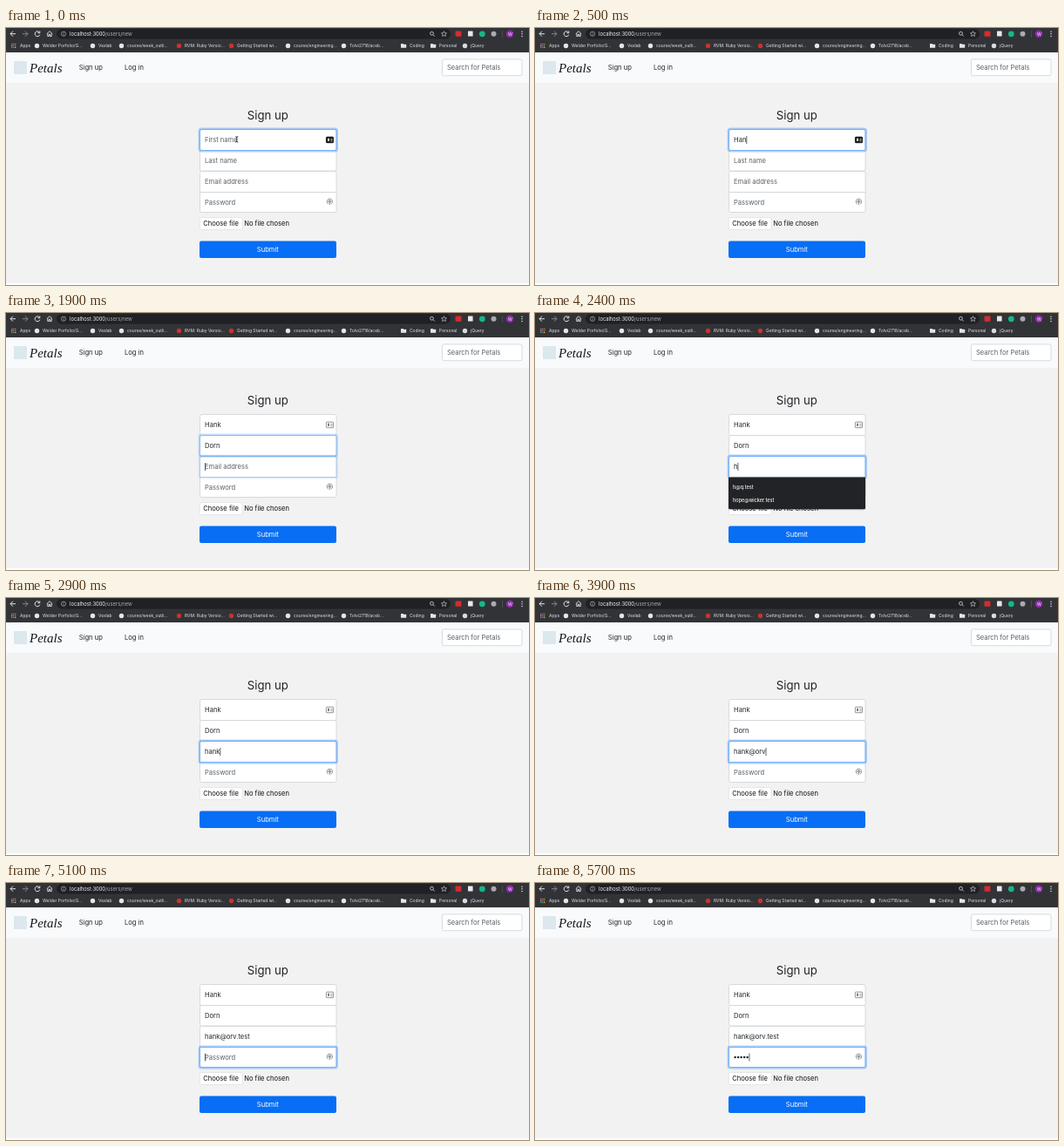
Write an HTML page with a canvas that moves like this. It is 600x295 px and loops after 5.8 s.

```html
<!DOCTYPE html>
<html lang="en">
<head>
<meta charset="utf-8">
<title>Sign up</title>
<style>
html, body { margin: 0; width: 100%; height: 100%; overflow: hidden; background: #f2f2f2; }
canvas { display: block; width: 600px; height: 295px; }
</style>
</head>
<body>
<canvas id="stage"></canvas>
<script>
const LOOP = 5800, STEP = 100;
const canvas = document.getElementById('stage');
const ctx = canvas.getContext('2d');
const ratio = window.devicePixelRatio || 1;
canvas.width = 600 * ratio;
canvas.height = 295 * ratio;

const INK = '#24282c', MUTED = '#5c6268', BORDER = '#ced3d8', LIGHT = '#e4e5e7';
const LEFT = 222.5, WIDTH = 156.5;

// keys: [time, number of characters typed so far]
const fields = [
  { y: 116.5, h: 24, hint: 'First name', value: 'Hank', focusAt: -1000, caretAt: 300,
    radii: 2, keys: [[300, 1], [500, 3], [600, 4]] },
  { y: 140.5, h: 23.5, hint: 'Last name', value: 'Dorn', focusAt: 760, caretAt: 800,
    radii: 2, keys: [[1200, 1], [1400, 2], [1500, 3], [1600, 4]] },
  { y: 164.5, h: 24, hint: 'Email address', value: 'hank@orv.test', focusAt: 1860, caretAt: 1900,
    radii: [2, 2, 0, 0], keys: [[2300, 1], [2500, 2], [2600, 3], [2700, 4], [3400, 5], [3700, 7],
      [3900, 8], [4000, 9], [4300, 10], [4500, 11], [4700, 13]] },
  { y: 188.5, h: 23, hint: 'Password', value: '*****', secret: true, focusAt: 4860, caretAt: 4900,
    radii: [0, 0, 2, 2], keys: [[5300, 1], [5400, 2], [5500, 3], [5600, 4], [5700, 5]] }
];
const menus = [
  { from: 300, to: 500, y: 141, items: ['H', 'Hope'] },
  { from: 2300, to: 2500, y: 188.7, items: ['h@q.test', 'hope@wicker.test'] }
];
const bookmarks = [
  [16, 'Apps'], [42, 'Welder Porfolio/G...', LIGHT], [106, 'Vexlab', LIGHT],
  [139, 'course/week_outli...', LIGHT], [205, 'RVM: Ruby Versio...', '#c8322f'],
  [265, 'Getting Started wi...', '#c8322f'], [330, 'course/engineering...', LIGHT],
  [394, 'Tolvi2718/aceb...', LIGHT], [463, 'Coding', 'folder'], [497, 'Personal', 'folder'],
  [533, 'jQuery', '#d5dbe2']
];

function text(str, x, y, size, color = INK, font = 'Inter, sans-serif', style = '') {
  ctx.font = `${style} ${size}px ${font}`;
  ctx.fillStyle = color;
  ctx.fillText(str, x, y);
  return x + ctx.measureText(str).width;
}
function rect(x, y, w, h, fill, radius = 0, stroke, line = 0.8) {
  ctx.beginPath();
  ctx.roundRect(x, y, w, h, radius);
  if (fill) { ctx.fillStyle = fill; ctx.fill(); }
  if (stroke) { ctx.strokeStyle = stroke; ctx.lineWidth = line; ctx.stroke(); }
}
function dot(x, y, r, fill) {
  ctx.beginPath();
  ctx.arc(x, y, r, 0, 7);
  ctx.fillStyle = fill;
  ctx.fill();
}
function path(d, color, line = 0.9, x = 0, y = 0) {
  ctx.save();
  ctx.translate(x, y);
  ctx.strokeStyle = color;
  ctx.lineWidth = line;
  ctx.stroke(new Path2D(d));
  ctx.restore();
}

function drawToolbar() {
  rect(0, 0, 600, 28, '#323337');
  rect(58, 1, 452, 11.5, '#202124', 5.7);
  path('M3 0H-3M0-3L-3 0L0 3', LIGHT, 1, 8, 6.7);
  path('M-3 0H3M0-3L3 0L0 3', '#85878b', 1, 22, 6.7);
  path('M2.3-1.8A2.9 2.9 0 1 0 2.8 1M2.8-3.2V-1H.5', LIGHT, 1, 36, 6.7);
  path('M-3.2 0L0-3L3.2 0M-2.2-.5V2.8H-.7V.6H.7V2.8H2.2V-.5', LIGHT, 0.9, 50, 6.7);
  path('M-2.6 0A2.6 2.6 0 1 1 2.6 0A2.6 2.6 0 1 1-2.6 0M0-1.5V-.8M0-.2V1.5', '#b4b6b9', 0.7, 66, 6.7);
  const end = text('localhost:3000', 73, 8.9, 5.8, '#f2f2f3');
  text('/users/new', end, 8.9, 5.8, '#a9abae');

  path('M-2.4-.5A1.9 1.9 0 1 1 1.4-.5A1.9 1.9 0 1 1-2.4-.5M.9.9L2.8 2.8', '#c9cbce', 0.9, 489, 6.7);
  path('M0-3L.9-1L3-.8L1.4.6L1.9 2.8L0 1.6L-1.9 2.8L-1.4.6L-3-.8L-.9-1Z', '#c9cbce', 0.7, 502.5, 6.7);
  rect(515.5, 3.4, 7, 6.4, '#d32d2f', 1);
  rect(530, 3.6, 5.6, 6, '#e8e8ea', 0.5);
  dot(546.3, 6.8, 3.4, '#16b788');
  dot(559.5, 6.8, 3, '#a9abae');
  rect(569, 3, 0.6, 8, '#5b5c60');
  dot(578, 6.8, 4.3, '#8e2aab');
  text('W', 575.9, 8.6, 4.8, '#fff');
  for (const y of [4.2, 6.8, 9.4]) dot(592, y, 0.75, LIGHT);

  const tints = ['#e5584b', '#eab53c', '#4fa865', '#5791ea'];
  for (let i = 0; i < 9; i++) {
    rect(6 + i % 3 * 2, 17.7 + Math.floor(i / 3) * 2, 1.4, 1.4, tints[(i * 3 + (i > 4)) % 4]);
  }
  for (const [x, label, icon] of bookmarks) {
    text(label, x, 22.4, 4.95, '#e3e4e6');
    if (icon === 'folder') {
      rect(x - 10, 18, 3, 2, LIGHT, 0.5);
      rect(x - 10, 18.8, 6.2, 4, LIGHT, 0.5);
    } else if (icon) dot(x - 6.5, 20.5, 2.7, icon);
  }
}

function drawPage() {
  rect(0, 28, 600, 35, '#f8fafb');
  rect(0, 63, 600, 230, '#f2f2f2');
  rect(0, 293, 600, 2, '#fff');
  rect(9, 38, 15, 15, '#dce8ee');
  text('Petals', 27, 50.5, 15, '#171717', '"Liberation Serif", serif', 'italic');
  text('Sign up', 83.7, 47.8, 7.6);
  text('Log in', 136, 47.8, 7.6);
  rect(500.4, 35.9, 91.6, 18.8, '#fff', 2, BORDER);
  text('Search for Petals', 506, 48, 7.6, MUTED);
  ctx.textAlign = 'center';
  text('Sign up', 300.3, 104.6, 13.2, '#202327');
  rect(222, 244.6, 157, 19.5, '#076ef5', 2);
  text('Submit', 300.3, 257.2, 7.6, '#fff');
  ctx.textAlign = 'left';
  rect(222.4, 217.5, 48.6, 14, '#fff', 1.5, '#d9dadc', 0.6);
  text('Choose file', 226.2, 227.2, 7.6, '#111');
  text('No file chosen', 273.2, 227.2, 7.6, '#111');
}

function drawIcons(active) {
  const card = active ? '#111' : '#777b80';
  rect(367.4, 125.1, 8.2, 6.6, active ? card : null, 0.8, card);
  const detail = active ? '#fff' : card;
  rect(369, 126.6, 2, 3.4, detail, 0.8);
  path('M372.3 127.2H374.6M372.3 128.6H374.6M372.3 130H374.6', detail, 0.6);
  path('M-1.5 2.9A3.2 3.2 0 1 1 1.5 2.9M-1 1.2A1.6 1.6 0 1 1 1 1.2M0-.2V4', '#777b80', 0.8, 371.4, 199.2);
  dot(371.4, 199.2, 0.9, '#777b80');
}

const clamp = v => Math.max(0, Math.min(1, v));
const ramp = (t, start) => clamp((t - start) / 120);

function drawFields(t) {
  const focus = fields.map((f, i) =>
    ramp(t, f.focusAt) - (fields[i + 1] ? ramp(t, fields[i + 1].focusAt) : 0));
  for (const f of fields) rect(LEFT, f.y, WIDTH, f.h, '#fff', f.radii, BORDER);
  fields.forEach((f, i) => {
    ctx.globalAlpha = focus[i];
    rect(LEFT - 1, f.y - 1, WIDTH + 2, f.h + 2, null, 2.6, 'rgba(0,115,255,.32)', 1.8);
    rect(LEFT, f.y, WIDTH, f.h, null, f.radii, '#74affa', 1);
  });
  ctx.globalAlpha = 1;

  fields.forEach((f, i) => {
    const count = f.keys.reduce((n, [at, len]) => t >= at ? len : n, 0);
    const base = f.y + f.h / 2 + 2.7;
    let end = 228;
    if (!count) text(f.hint, 228, base, 7.6, MUTED);
    else if (f.secret) {
      for (let k = 0; k < count; k++) dot(229.6 + k * 3.5, base - 2.7, 1.25, INK);
      end += count * 3.5;
    } else end = text(f.value.slice(0, count), 228, base, 7.6);

    const next = fields[i + 1];
    const blinkedOff = t >= 3200 && t < 3400;
    if (t >= f.caretAt && !(next && t >= next.caretAt) && !blinkedOff) {
      rect(end + 0.1, base - 7.2, 0.7, 9, '#222');
    }
  });
}

function drawMenu({ y, items }) {
  ctx.save();
  ctx.shadowColor = 'rgba(0,0,0,.3)';
  ctx.shadowBlur = 2 * ratio;
  rect(222, y, 157, 36.6, '#222326', [0, 0, 1.5, 1.5]);
  ctx.restore();
  items.forEach((item, i) => text(item, 227, y + 13 + i * 14.8, 5.5, '#f3f3f4', undefined, '500'));
}

function draw(time) {
  const t = Math.floor(time % LOOP / STEP) * STEP;
  ctx.setTransform(ratio, 0, 0, ratio, 0, 0);
  drawToolbar();
  drawPage();
  drawFields(t);
  drawIcons(t < 800);
  if (t < 300) path('M-1.5-3.2Q0-3.2 0-2.2V2.2Q0 3.2-1.5 3.2M1.5-3.2Q0-3.2 0-2.2M0 2.2Q0 3.2 1.5 3.2', '#222', 0.9, 264.8, 127.8);
  menus.filter(m => t >= m.from && t < m.to).forEach(drawMenu);
}

const start = performance.now();
function tick() {
  draw(performance.now() - start);
  requestAnimationFrame(tick);
}
tick();
</script>
</body>
</html>
```
